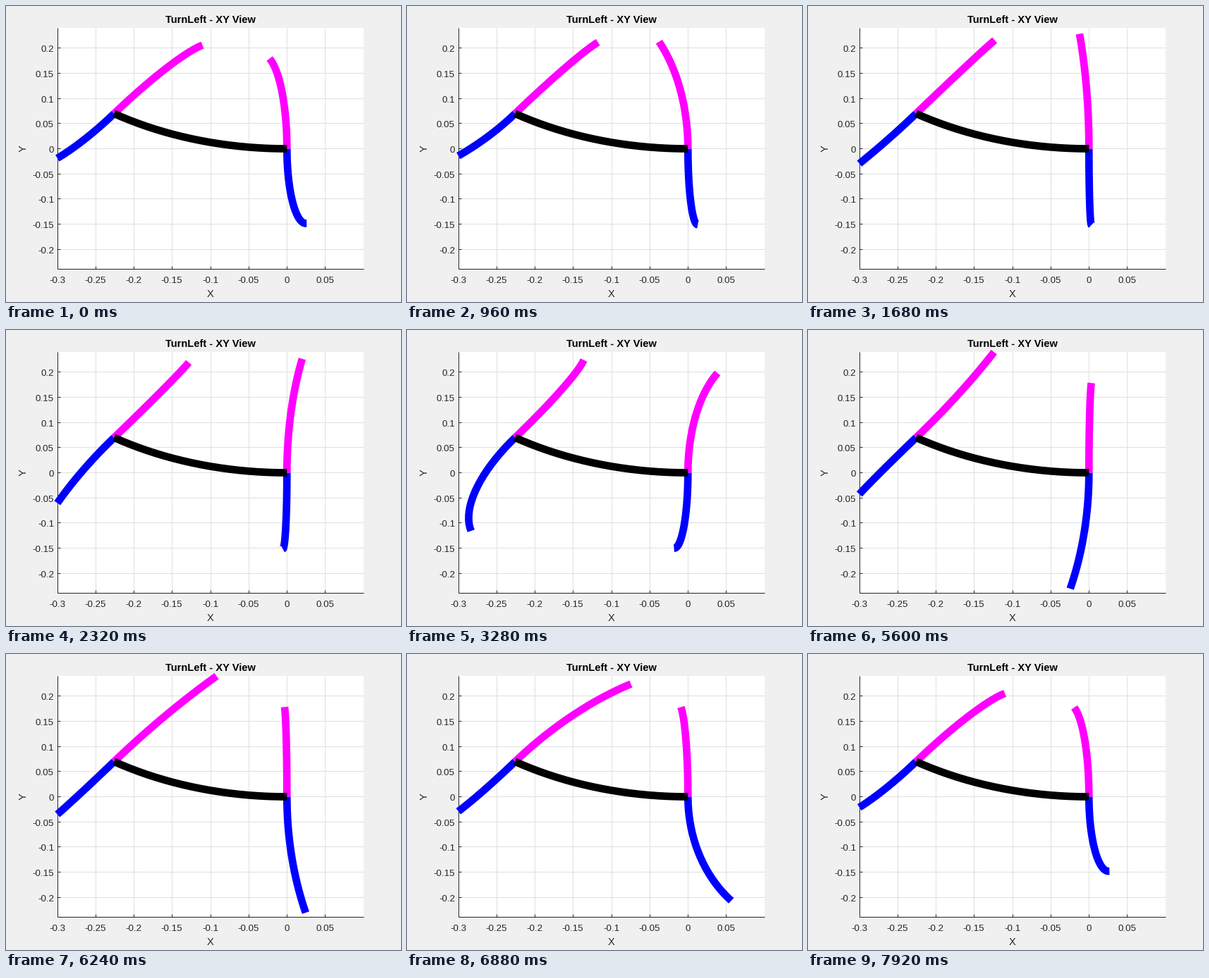
Write a matplotlib script that moves like this. It is 560 by 420 pixels and loops after 8000 ms.

```python
import numpy as np
import matplotlib.pyplot as plt
from matplotlib.animation import FuncAnimation
from matplotlib.patches import Rectangle

W, H, DPI = 560, 420, 100
FRAMES, INTERVAL = 100, 80
PT = 72 / DPI                        # points per pixel

LEFT, RIGHT, TOP, BOTTOM = 72.8, 506.8, 31.3, 373.8
X_MIN, X_MAX, Y_MAX = -0.3, 0.1, 0.24
INK = (0.15, 0.15, 0.15)
MAGENTA, BLUE = "#ff00ff", "#0000ff"

LENGTH = 0.24                        # length of the body and of each limb
BEND = 0.6                           # bend of the body, radians

# Tip path: sideways radius, half swing angle in degrees, lift in stance,
# and reach as a polynomial in cos(phase), highest power first
PATHS = {
    MAGENTA: (0.0396, 151, 0.001, (-0.0033, 0.0282, 0.2047)),
    BLUE: (0.0590, 153, 0.0037, (0.0075, -0.0088, 0.0399, 0.1959)),
}

# Bend angle of an arc from its reach divided by its length
ANGLES = np.linspace(2.4, 0.01, 500)
REACHES = np.sin(ANGLES) / ANGLES


def to_px(x, y):
    px = LEFT + (np.asarray(x) - X_MIN) * (RIGHT - LEFT) / (X_MAX - X_MIN)
    py = BOTTOM - (np.asarray(y) + Y_MAX) * (BOTTOM - TOP) / (2 * Y_MAX)
    return px, py


def tip(color, t, start):
    """Reach and sideways offset: half a cycle of swing, half of stance."""
    radius, half_angle, lift, reach = PATHS[color]
    chord = np.radians(half_angle)
    u = (t - start) % 1.0
    if u < 0.5:
        phase = chord * (4 * u - 1)
        return np.polyval(reach, np.cos(phase)), radius * np.sin(phase)
    v = 2 * u - 1
    rise = 4 * lift * v * (1 - v)
    return (np.polyval(reach, np.cos(chord)) + rise,
            radius * np.sin(chord) * (1 - 2 * v))


def limb(base, turn, sign, color, t, start):
    """Constant-curvature arc in space, seen from above."""
    reach, side = tip(color, t, start)
    theta = np.interp(reach / LENGTH, REACHES, ANGLES)
    arc = theta * np.linspace(0, 1, 20)
    along = sign * LENGTH / theta * np.sin(arc)
    across = side * (1 - np.cos(arc)) / (1 - np.cos(theta))
    s, c = np.sin(turn), np.cos(turn)
    return base[0] + along * s + across * c, base[1] + along * c - across * s


def cut(x, y):
    """Keep the line up to where it first leaves the plot box."""
    room = np.minimum.reduce([x - X_MIN, Y_MAX - y, y + Y_MAX])
    outside = np.flatnonzero(room < 0)
    if outside.size == 0:
        return x, y
    k = outside[0]
    f = room[k - 1] / (room[k - 1] - room[k])
    end_x = x[k - 1] + f * (x[k] - x[k - 1])
    end_y = y[k - 1] + f * (y[k] - y[k - 1])
    return np.append(x[:k], end_x), np.append(y[:k], end_y)


fig = plt.figure(figsize=(W / DPI, H / DPI), dpi=DPI, facecolor="#f0f0f0")
ax = fig.add_axes([0, 0, 1, 1])
ax.set_xlim(0, W)
ax.set_ylim(H, 0)
ax.axis("off")


def label(x, y, text, size, **kw):
    kw = {"ha": "center", "va": "baseline", "color": INK, **kw}
    ax.text(x, y, text, fontsize=size * PT, family="Liberation Sans", **kw)


def thin(xs, ys, color, z):
    ax.plot(xs, ys, color=color, lw=PT, zorder=z, solid_capstyle="butt")


def to_grid(x, y):
    """Whole pixel column and row of a grid line."""
    px, py = to_px(x, y)
    return round(float(px) - 0.15), int(py)


def draw_plot_box():
    left, bottom = to_grid(X_MIN, -Y_MAX)
    right, top = 507, 31
    ax.add_patch(Rectangle((left, top), right - left, 343,
                           fc="white", ec="none", zorder=0))
    grid = (0.873,) * 3
    for k in range(-6, 2):
        col, _ = to_grid(k / 20, 0)
        if k > -6:
            thin([col, col], [top, bottom], grid, 1)
        thin([col, col], [bottom, bottom - 4], INK, 2)
        label(col, 393, f"{k / 20:g}", 13.33)
    for k in range(-4, 5):
        _, row = to_grid(0, k / 20)
        thin([left, right], [row, row], grid, 1)
        thin([left, left + 4], [row, row], INK, 2)
        label(68, row + 6, f"{k / 20:g}", 13.33, ha="right")
    thin([left, left], [top, bottom], INK, 2)
    thin([left, right], [bottom, bottom], INK, 2)
    label(290, 413, "X", 14.67)
    label(29, 202.5, "Y", 14.67, rotation=90, rotation_mode="anchor")
    label(290, 24, "TurnLeft - XY View", 14.67, weight="bold", color="black")


def thick(color, z):
    return ax.plot([], [], color=color, lw=10.67 * PT, zorder=z,
                   solid_capstyle="butt", solid_joinstyle="round")[0]


draw_plot_box()

bend = np.linspace(0, BEND, 20)
body_radius = LENGTH / BEND
body_x, body_y = -body_radius * np.sin(bend), body_radius * (1 - np.cos(bend))
thick("black", 5).set_data(*to_px(body_x, body_y))

FRONT, REAR = (0.0, 0.0), (body_x[-1], body_y[-1])
# base, turn, direction, colour, start of swing
LIMBS = [
    (FRONT, 0.0, -1, BLUE, 0.49),
    (REAR, BEND, -1, BLUE, 0.99),
    (FRONT, 0.0, 1, MAGENTA, 0.99),
    (REAR, BEND, 1, MAGENTA, 0.49),
]
lines = [thick(color, 3 if color == BLUE else 4) for *_, color, _ in LIMBS]


def update(i):
    t = i / FRAMES
    for line, (base, turn, sign, color, start) in zip(lines, LIMBS):
        line.set_data(*to_px(*cut(*limb(base, turn, sign, color, t, start))))
    return lines


anim = FuncAnimation(fig, update, frames=FRAMES, interval=INTERVAL,
                     repeat=True, repeat_delay=0)
plt.show()
```
